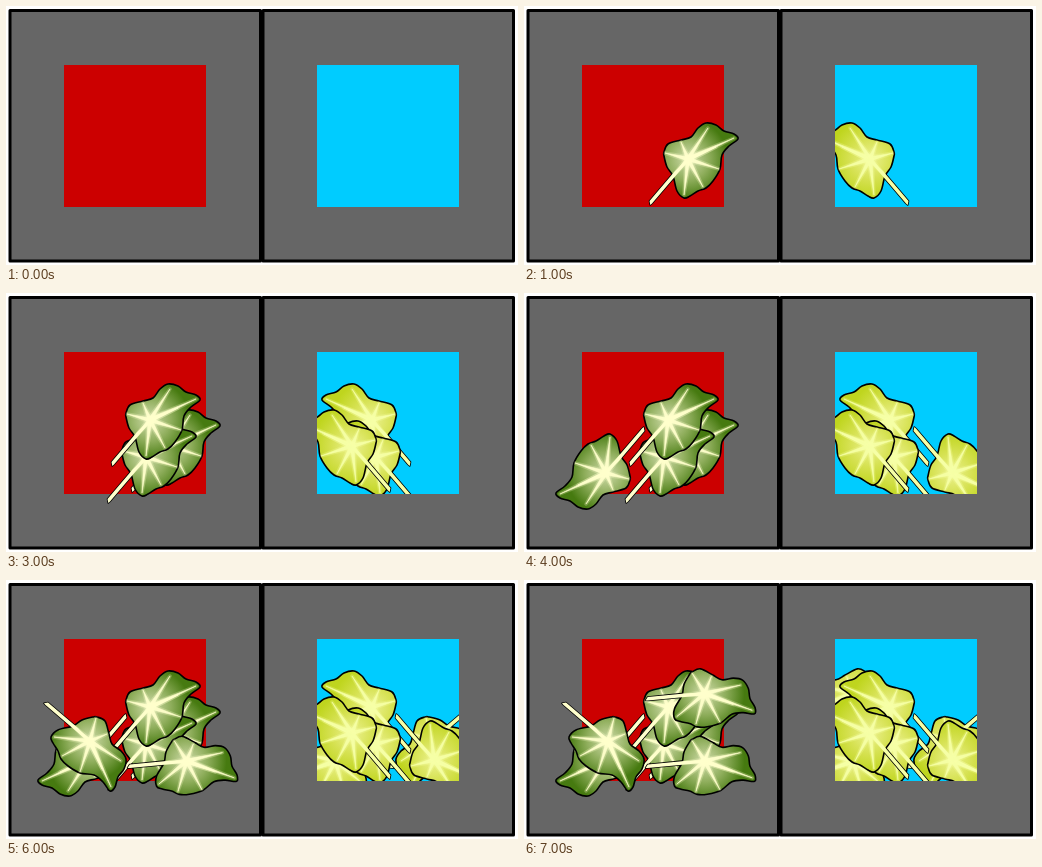
Recreate the animation shown at these times as an HTML page with a canvas. Size 512 px wide and 259 px high, loop 8000 ms.

```html
<!DOCTYPE html>
<html lang="en">
<head>
<meta charset="utf-8">
<title>Leaves seen from both sides</title>
<style>
  html, body { margin: 0; width: 100%; height: 100%; overflow: hidden; background: #fff; }
  canvas { display: block; }
</style>
</head>
<body>
<canvas id="stage" width="512" height="259"></canvas>
<script>
const ctx = document.getElementById('stage').getContext('2d');
const STEP = 1000, STEPS = 8;

// Leaf geometry, measured from the end of the stem.
const HUB = [38, -45];
const EDGE = [
  [14, -52], [18, -60], [31, -64], [41, -67], [48, -76], [56, -81], [66, -79],
  [74, -73], [84, -70], [88, -65], [79, -58], [72, -49], [70, -35], [63, -23],
  [56, -16], [48, -13], [40, -8], [34, -6], [27, -13], [23, -28], [17, -37], [14, -48]
];
const VEINS = [
  [84, -66], [66, -57], [58, -76], [31, -62], [15, -51],
  [23, -28], [34, -9], [53, -17], [69, -35]
];

// Where each stem ends, and the turn of its leaf in degrees.
const LEAVES = [
  [126, 198, 0], [102, 209, 0], [106, 172, 0], [120, 135, 180],
  [39, 123, 90], [122, 187, 44], [122, 119.5, 44]
];

const FRONT = { shades: ['#cbd8a4', '#8fae5c', '#467a10'], vein: '#ffffcc' };
const BACK = { shades: ['#eaf08a', '#d5e150', '#bfd51e'], vein: '#f6ffa6' };

function smoothLoop(points) {
  const path = new Path2D(), n = points.length;
  const at = i => points[(i + n) % n];
  path.moveTo(...points[0]);
  for (let i = 0; i < n; i++) {
    const [a, b, c, d] = [at(i - 1), at(i), at(i + 1), at(i + 2)];
    path.bezierCurveTo(
      b[0] + (c[0] - a[0]) / 6, b[1] + (c[1] - a[1]) / 6,
      c[0] - (d[0] - b[0]) / 6, c[1] - (d[1] - b[1]) / 6,
      c[0], c[1]);
  }
  path.closePath();
  return path;
}

// A spike from the hub that narrows to a point.
function spike([x, y], width) {
  const dx = x - HUB[0], dy = y - HUB[1];
  const k = width / 2 / Math.hypot(dx, dy);
  const path = new Path2D();
  path.moveTo(HUB[0] - dy * k, HUB[1] + dx * k);
  path.lineTo(x, y);
  path.lineTo(HUB[0] + dy * k, HUB[1] - dx * k);
  path.closePath();
  return path;
}

const outline = smoothLoop(EDGE);
const veins = VEINS.map(tip => spike(tip, 4));
const stem = new Path2D('M-.5 -3 L25 -33 L38 -46 L39.5 -44 L28 -31 L2 -.5 L.3 1 Z');

function fillAndLine(path, fill, width) {
  ctx.fillStyle = fill;
  ctx.fill(path);
  ctx.lineWidth = width;
  ctx.stroke(path);
}

function drawLeaf([x, y, turn], { shades, vein }) {
  ctx.save();
  ctx.translate(x, y);
  ctx.rotate(turn * Math.PI / 180);
  ctx.lineJoin = 'round';
  const shade = ctx.createRadialGradient(...HUB, 2, ...HUB, 40);
  shades.forEach((color, i) => shade.addColorStop(i / 2, color));
  ctx.strokeStyle = '#000';
  fillAndLine(outline, shade, 1.6);

  ctx.save();
  ctx.clip(outline);
  ctx.strokeStyle = ctx.fillStyle = vein;
  for (const path of veins) {
    ctx.globalAlpha = 0.25;
    ctx.lineWidth = 3.5;
    ctx.stroke(path);
    ctx.globalAlpha = 0.95;
    ctx.lineWidth = 0.6;
    ctx.fill(path);
    ctx.stroke(path);
  }
  ctx.restore();

  ctx.save();
  const outside = new Path2D('M-20 -100 H120 V20 H-20 Z');
  outside.addPath(outline);
  ctx.clip(outside, 'evenodd');
  fillAndLine(stem, '#ffffcc', 1.6);
  ctx.restore();
  ctx.fillStyle = vein;
  ctx.fill(stem);
  ctx.restore();
}

function drawPanel(x, windowX, color) {
  ctx.lineJoin = 'round';
  ctx.lineWidth = 3;
  ctx.strokeStyle = '#000';
  ctx.fillStyle = '#666';
  ctx.fillRect(x, 4.5, 250.5, 250.5);
  ctx.strokeRect(x, 4.5, 250.5, 250.5);
  ctx.fillStyle = color;
  ctx.fillRect(windowX, 59, 142, 142);
}

function draw(now) {
  const shown = LEAVES.slice(0, Math.floor(now / STEP) % STEPS);
  ctx.clearRect(0, 0, 512, 259);
  drawPanel(4, 58, '#cc0000');
  drawPanel(257, 311, '#00ccff');
  shown.forEach(leaf => drawLeaf(leaf, FRONT));

  // From behind, the pile is mirrored and the first leaf is nearest.
  ctx.save();
  ctx.beginPath();
  ctx.rect(311, 59, 142, 142);
  ctx.clip();
  ctx.translate(510, 0);
  ctx.scale(-1, 1);
  shown.reverse().forEach(leaf => drawLeaf(leaf, BACK));
  ctx.restore();
}

const start = performance.now();
function tick() {
  draw(performance.now() - start);
  requestAnimationFrame(tick);
}
tick();
</script>
</body>
</html>
```
